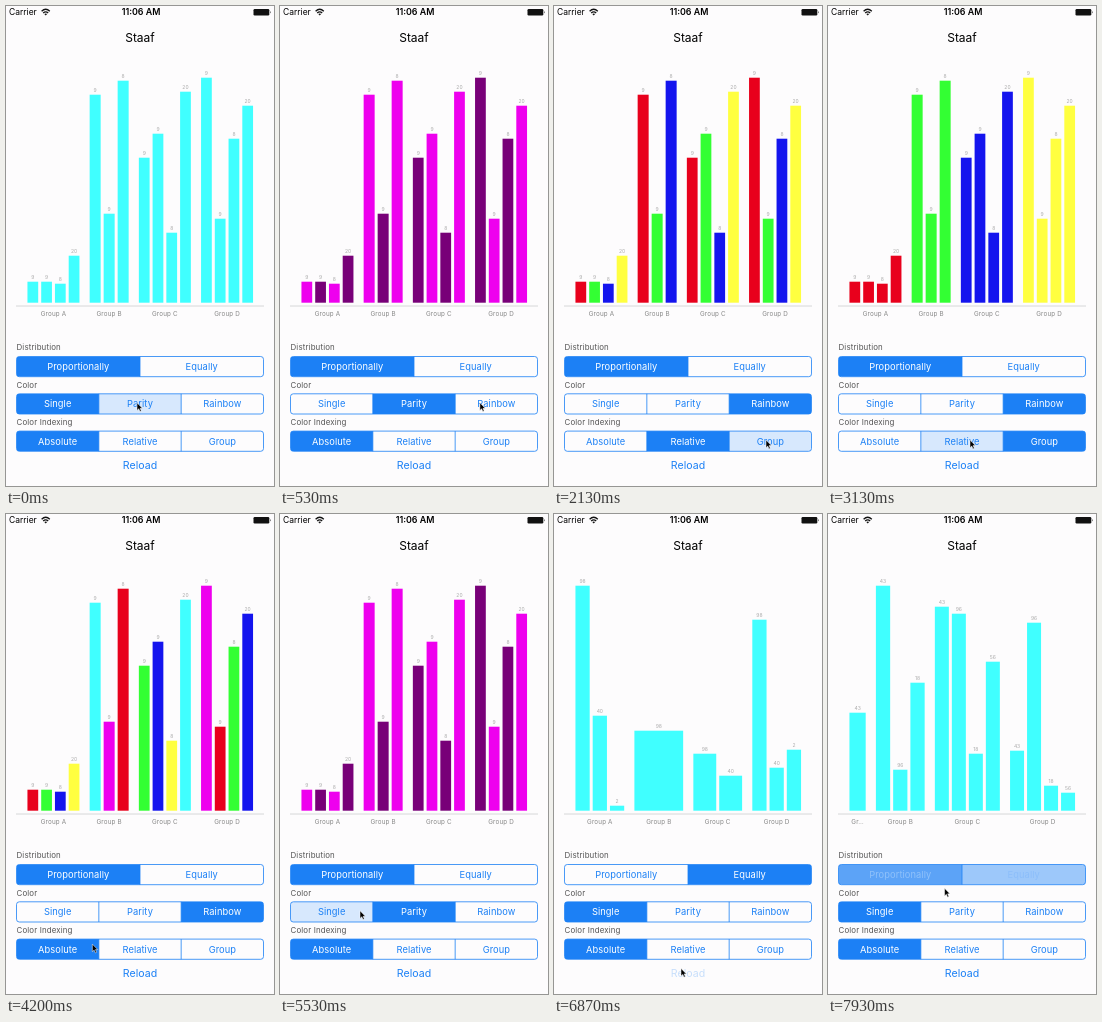
An HTML page that plays this animation: 268x480 px, repeating every 8 s.

```html
<!DOCTYPE html>
<html lang="en">
<head>
<meta charset="utf-8">
<title>Bar chart demo</title>
<style>
  html, body { margin: 0; width: 100%; height: 100%; overflow: hidden; background: #fdfcfd; }
  svg { display: block; width: 100%; height: 100%; font-family: Inter, Roboto, sans-serif; }
  text { text-anchor: middle; }
  .start { text-anchor: start; }
  .heading { font-size: 7.9px; letter-spacing: .14px; fill: #555; text-anchor: start; }
  .segment { font-size: 9.3px; letter-spacing: .07px; }
  .value { font-size: 5px; fill: #aaa; }
  .group { font-size: 6.3px; letter-spacing: .15px; fill: #888; }
</style>
</head>
<body>
<svg viewBox="0 0 268 480">
  <rect width="268" height="480" fill="#fdfcfd"/>
  <text class="start" x="3" y="9.2" font-size="8.5">Carrier</text>
  <g fill="none" stroke="#111" stroke-width="1.3">
    <path d="M35.6 5.3Q39.7 1.3 43.8 5.3M37.2 7Q39.7 4.7 42.2 7"/>
    <path d="M39.7 9.6L38.3 8Q39.7 6.8 41.1 8Z" fill="#111" stroke="none"/>
  </g>
  <text x="135" y="9.3" font-size="8.9" font-weight="600">11:06 AM</text>
  <rect x="247.5" y="3" width="15.8" height="6.4" rx="1.2" fill="#111"/>
  <path d="M264 4.9Q265.3 6.2 264 7.5Z"/>
  <text x="134" y="35.6" font-size="12">Staaf</text>
  <path d="M10 300H258" stroke="#d2d2d4" stroke-width=".9"/>
  <g id="chart"></g>
  <g id="controls"></g>
  <text id="reload" x="134" y="463.4" font-size="10.6" fill="#1c80f5">Reload</text>
  <path id="cursor" d="M0 0V7.6L1.8 6L3 8.8L4.3 8.2L3.1 5.5H5.4Z" fill="#000" stroke="#fff" stroke-width=".5"/>
</svg>
<script>
const LOOP = 8000, HOLD = 140, TRAVEL = 350, SETTLE = 50, FADE = 120;
const BLUE = [28, 128, 245];
const RAINBOW = ['#e8001c', '#33ff33', '#1414ee', '#ffff40', '#40ffff', '#ee00ee'];
const PALETTES = [['#40ffff'], ['#ee00ee', '#780078'], RAINBOW];
const [DIST, COLOR, INDEX, RELOAD] = [0, 1, 2, 3];
const LEFT = 10.5, WIDTH = 247, HEIGHT = 20.2;
const CHART = { left: 21.45, width: 195, gap: 10.2, barGap: 3, base: 296.7 };

const ROWS = [
  ['Distribution', 'Proportionally', 'Equally'],
  ['Color', 'Single', 'Parity', 'Rainbow'],
  ['Color Indexing', 'Absolute', 'Relative', 'Group']
].map(([title, ...items]) => ({ title, items }));
const rowY = row => 350.5 + 37.3 * row;

// Bar heights by group; every group shares the value labels
const DATA = [
  { labels: [9, 9, 8, 20], groups: [[21, 21, 19, 47], [208, 89, 222], [145, 169, 70, 211], [225, 84, 164, 197]] },
  { labels: [98, 40, 2], groups: [[225, 95, 5], [80], [57, 35], [191, 43, 61]] },
  { labels: [43, 96, 18, 56], groups: [[98], [225, 41, 128], [204, 197, 57, 149], [60, 188, 25, 18]] }
];

// Release time, row and pointer x; the segment follows from x
const CLICKS = [
  [130, COLOR, 131], [730, COLOR, 200], [1470, INDEX, 142], [2270, INDEX, 212],
  [3200, INDEX, 142], [3800, INDEX, 81], [4670, COLOR, 131], [5600, COLOR, 80],
  [6270, DIST, 190], [6860, RELOAD, 127], [7200, RELOAD, 127], [7870, DIST, 107],
  [LOOP + 320, COLOR, 131]
].map(([up, row, x]) => ({
  up, row, x,
  down: up - HOLD,
  y: rowY(row) + (row === RELOAD ? -8 : 9),
  item: row === RELOAD ? 0 : Math.floor((x - LEFT) / WIDTH * ROWS[row].items.length)
}));

const $ = id => document.getElementById(id);
const clamp = v => Math.max(0, Math.min(1, v));
const smooth = v => v * v * (3 - 2 * v);

function add(parent, tag, attrs, text) {
  const el = document.createElementNS('http://www.w3.org/2000/svg', tag);
  for (const name in attrs) el.setAttribute(name, attrs[name]);
  if (text !== undefined) el.textContent = text;
  parent.appendChild(el);
  return el;
}

function buildRow({ title, items }, row) {
  const g = $('controls'), y = rowY(row), width = WIDTH / items.length;
  const frame = { x: LEFT, y, width: WIDTH, height: HEIGHT, rx: 2.8 };
  const stroke = { stroke: '#1c80f5', 'stroke-width': .8 };
  add(g, 'text', { class: 'heading', x: LEFT, y: y - 6.2 }, title);
  add(add(g, 'clipPath', { id: 'clip' + row }), 'rect', frame);
  const fills = add(g, 'g', { 'clip-path': `url(#clip${row})` });
  const segments = items.map((name, i) => {
    const x = LEFT + i * width;
    const fill = add(fills, 'rect', { x, y, width, height: HEIGHT, fill: '#1c80f5' });
    if (i) add(g, 'path', { d: `M${x} ${y}v${HEIGHT}`, ...stroke });
    const label = add(g, 'text', { class: 'segment', x: x + width / 2, y: y + 13.5 }, name);
    return { fill, label };
  });
  add(g, 'rect', { ...frame, fill: 'none', ...stroke });
  return segments;
}

const segments = ROWS.map(buildRow);

function drawChart([dist, color, index, data]) {
  const chart = $('chart'), palette = PALETTES[color];
  const { labels, groups } = DATA[data];
  const total = groups.flat().length;
  let x = CHART.left, count = 0;
  chart.replaceChildren();
  groups.forEach((bars, group) => {
    const groupWidth = CHART.width * (dist ? 1 / groups.length : bars.length / total);
    const step = (groupWidth + CHART.barGap) / bars.length;
    const width = step - CHART.barGap;
    bars.forEach((height, i) => {
      const left = x + i * step, y = CHART.base - height;
      const hue = [count++, i, group][index] % palette.length;
      add(chart, 'rect', { x: left, y, width, height, fill: palette[hue] });
      add(chart, 'text', { class: 'value', x: left + width / 2, y: y - 2.6 }, labels[i]);
    });
    const name = groupWidth < 25 ? 'Gr…' : 'Group ' + 'ABCD'[group];
    add(chart, 'text', { class: 'group', x: x + groupWidth / 2, y: 310.4 }, name);
    x += groupWidth + CHART.gap;
  });
}

// A new selection fills in faster than the old one clears
function segmentLook(t, last, previous, item) {
  const k = clamp((t - last.up) / FADE);
  if (last.item === previous) return { fill: +(item === last.item), text: +(item === last.item) };
  if (item === last.item) return { fill: k ** .5, text: k };
  if (item === previous) return { fill: (1 - k) ** 1.2, text: 1 - k };
  return { fill: 0, text: 0 };
}

function drawControls(t) {
  segments.forEach((list, row) => {
    const clicks = CLICKS.filter(c => c.row === row);
    const past = clicks.filter(c => c.up <= t);
    const last = past.at(-1) || { up: 0, item: 0 };
    const previous = past.length > 1 ? past.at(-2).item : 0;
    const pressed = clicks.find(c => c.down <= t && t < c.up);
    list.forEach(({ fill, label }, i) => {
      const look = segmentLook(t, last, previous, i);
      const tint = pressed && pressed.item === i ? .17 : 0;
      fill.setAttribute('opacity', Math.max(look.fill, tint));
      label.setAttribute('fill', `rgb(${BLUE.map(c => Math.round(c + (255 - c) * look.text))})`);
    });
  });
  const reload = CLICKS.filter(c => c.row === RELOAD && c.down <= t).at(-1);
  $('reload').setAttribute('opacity', reload ? .2 + .8 * clamp((t - reload.up) / 250) : 1);
}

function drawCursor(t) {
  let { x, y } = CLICKS[0];
  for (const click of CLICKS) {
    const k = smooth(clamp((t - click.down + SETTLE + TRAVEL) / TRAVEL));
    x += (click.x - x) * k;
    y += (click.y - y) * k;
  }
  $('cursor').setAttribute('transform', `translate(${x} ${y})`);
}

let shown = '';
function render(t) {
  const state = [0, 0, 0, 0];
  for (const { up, row, item } of CLICKS) {
    if (t >= up) state[row] = row === RELOAD ? state[row] + 1 : item;
  }
  if (shown !== String(state)) {
    shown = String(state);
    drawChart(state);
  }
  drawControls(t);
  drawCursor(t);
}

const start = performance.now();
function tick() {
  render((performance.now() - start) % LOOP);
  requestAnimationFrame(tick);
}
tick();
</script>
</body>
</html>
```
